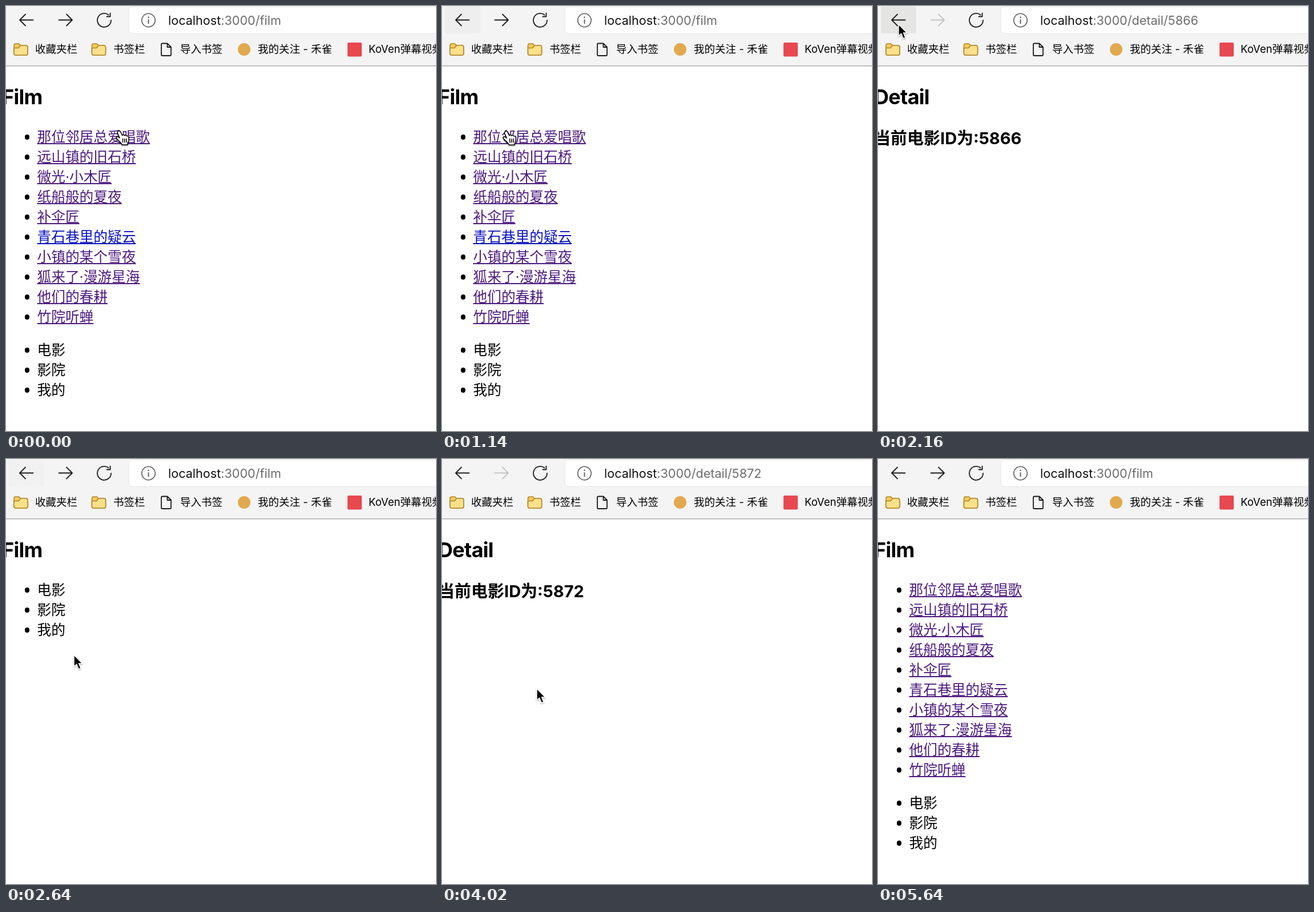
These frames come from a looping animation (753x744 px, 5700 ms). An HTML page:

```html
<!DOCTYPE html>
<html lang="zh-CN">
<head>
<meta charset="utf-8">
<title>Film list</title>
<style>
html, body { margin: 0; width: 100%; height: 100%; overflow: hidden; background: #fff; }
body { position: relative; color: #000; font-family: Inter, "Noto Sans CJK SC", "Noto Sans CJK", sans-serif; }
svg { position: absolute; left: 0; top: 0; overflow: visible; }
h2, h3 { position: absolute; left: -7px; margin: 0; white-space: nowrap; }
h2 { top: 137px; font-size: 36px; line-height: 44px; letter-spacing: -.02em; }
h3 { top: 214px; font-size: 29px; line-height: 35px; }
ul { position: absolute; left: 0; top: 211.5px; margin: 0; padding: 0; list-style: none; font-size: 24.7px; line-height: 35px; }
li { position: relative; height: 35px; padding-left: 54.5px; white-space: nowrap; }
li::before { content: ""; position: absolute; left: 32.5px; top: 13.5px; width: 8.5px; height: 8.5px; border-radius: 50%; background: #000; }
a { color: #4d1b7f; text-decoration: underline 2px; text-underline-offset: 2px; text-decoration-skip-ink: none; }
a.fresh { color: #0a12c0; }
a.active { color: #cb2119; }
.icon { fill: none; stroke: #1b1b1b; stroke-width: 1.8; stroke-linecap: round; stroke-linejoin: round; }
.marks { font-size: 18.5px; }
</style>
</head>
<body>
<h2 id="title"></h2>
<h3 id="info"></h3>
<ul id="films"></ul>
<ul id="tabs"><li>电影</li><li>影院</li><li>我的</li></ul>

<svg width="753" height="744" viewBox="0 0 753 744">
  <defs>
    <g id="folder" stroke="#b1862b" stroke-width="1.6" stroke-linejoin="round">
      <path fill="#f5c95c" d="M1 4a3 3 0 0 1 3-3h5.500l3 3H22a3 3 0 0 1 3 3v11a3 3 0 0 1-3 3H4a3 3 0 0 1-3-3z"/>
      <path fill="#fde08a" d="M1 8.500h8l3.500-4.500H22a3 3 0 0 1 3 3v11a3 3 0 0 1-3 3H4a3 3 0 0 1-3-3z"/>
    </g>
    <filter id="shade" x="-50%" y="-50%" width="200%" height="200%">
      <feDropShadow dx="0" dy="1.5" stdDeviation="1.3" flood-opacity=".35"/>
    </filter>
  </defs>
  <path fill="#f4f4f4" d="M0 0h753v104H0z"/>
  <path fill="#adadad" d="M0 104h753v1.500H0z"/>
  <rect id="button" x="5" y="1" width="62" height="47" rx="4"/>
  <rect x="215" y="1.500" width="560" height="46.500" rx="6" fill="#fff" stroke="#e6e6e6"/>
  <g class="icon">
    <path d="M47.500 24.500H24M34 14.500l-10 10 10 10"/>
    <path id="forward" d="M92.500 24.500H116M106 14.500l10 10-10 10"/>
    <path d="M179.500 15.500A12 12 0 1 0 184 25M182.500 12.500v6h-6"/>
  </g>
  <g fill="none" stroke="#5a5a5a" stroke-width="1.6">
    <circle cx="249.500" cy="25" r="11.700"/>
    <path d="M249.500 23.500v7.500" stroke-width="1.900"/>
    <circle cx="249.500" cy="19.700" r="1.300" fill="#5a5a5a" stroke="none"/>
  </g>
  <text x="284" y="32.500" font-size="21.6" fill="#6c6c6c"><tspan fill="#111">localhost</tspan><tspan id="path"></tspan></text>

  <use href="#folder" x="13" y="65"/>
  <use href="#folder" x="149.500" y="65"/>
  <path class="icon" fill="#fff" d="M274 65.500h8.500l6.500 6.500v13a2 2 0 0 1-2 2h-13a2 2 0 0 1-2-2V67.500a2 2 0 0 1 2-2zM282.500 65.500V72H289"/>
  <circle cx="417" cy="76" r="11" fill="#e3a94e"/>
  <rect x="598" y="64" width="25" height="24.500" rx="2" fill="#e8484f"/>
  <g class="marks">
    <text x="51" y="82">收藏夹栏</text>
    <text x="188" y="82">书签栏</text>
    <text x="305" y="82">导入书签</text>
    <text x="441" y="82">我的关注 - 禾雀</text>
    <text x="635" y="82">KoVen弹幕视频</text>
  </g>

  <g id="cursor" filter="url(#shade)">
    <path id="arrow" fill="#000" stroke="#fff" stroke-width="1.400" stroke-linejoin="round"
      d="M0 0V20.500L4.600 16.300 8.200 24.800 12 23.200 8.500 15H14.800Z"/>
    <g id="hand" transform="translate(-5 -2)" stroke="#000" stroke-width="1.500" stroke-linejoin="round" stroke-linecap="round">
      <path fill="#fff" d="M4 2.500C6 .5 8 2 9 4l2.500 5.500C13 8 15 8.300 15.500 9.800 17 8.600 19 9 19.500 10.700 21.500 9.800 23 11 23 13v5c0 2-1.500 3.500-2 6v2H11C10.500 23 7 20.500 4 17.500 1 15 0 13 1.500 12c2-1 4 .5 5.500 2L3.500 6C3 4.500 3 3.500 4 2.500Z"/>
      <path d="M12.500 15.500v6M15.700 15.500v6M18.900 15.500v6"/>
    </g>
  </g>
</svg>

<script>
const LOOP = 5700, TICK = 60, FADE = 300;
const $ = id => document.getElementById(id);
const names = ['那位邻居总爱唱歌', '远山镇的旧石桥', '微光·小木匠', '纸船般的夏夜', '补伞匠',
  '青石巷里的疑云', '小镇的某个雪夜', '狐来了·漫游星海', '他们的春耕', '竹院听蝉'];
$('films').innerHTML = names.map(n => `<li><a>${n}</a></li>`).join('');
const links = [...document.querySelectorAll('a')];

// One visit per round: press a link, read its detail, go back, wait for the list.
const visits = [
  { link: 0, id: 5860, press: 60, open: 180, hover: 660, hold: 720, back: 840, load: 1140, leave: 960 },
  { link: 3, id: 5866, press: 1680, open: 1800, hover: 2160, hold: 2220, back: 2340, load: 2700, leave: 2400 },
  { link: 5, id: 5872, press: 3780, open: 3840, hover: 4380, hold: 4440, back: 4560, load: 4920, leave: 4800 }
];

// Pointer stops: time, x, y
const stops = [
  [0, 197, 219], [240, 197, 219], [600, 70, 60], [720, 34, 27], [900, 36, 40],
  [1200, 120, 240], [1560, 140, 333], [1920, 140, 333], [2160, 36, 32], [2220, 34, 27],
  [2340, 34, 27], [2640, 119, 343], [3060, 150, 390], [3600, 166, 402], [4020, 166, 402],
  [4260, 70, 150], [4380, 36, 32], [4440, 34, 27], [4620, 34, 27], [4800, 45, 70], [4920, 61, 203],
  [5160, 63, 704], [5460, 63, 370], [5580, 63, 275], [5700, 63, 275]
];

const within = (t, from, to) => t >= from && t < to;

function pointerAt(t) {
  const i = stops.findIndex(s => s[0] > t);
  const [t0, x0, y0] = stops[i - 1], [t1, x1, y1] = stops[i];
  const k = (t - t0) / (t1 - t0), e = k * k * (3 - 2 * k);
  return [x0 + (x1 - x0) * e, y0 + (y1 - y0) * e];
}

function buttonFill(t) {
  for (const v of visits) {
    if (within(t, v.hold, v.back)) return 'rgb(197,197,197)';
    if (within(t, v.hover, v.leave)) return 'rgb(229,229,228)';
    if (within(t, v.leave, v.leave + FADE)) {
      const c = 229 + 15 * (t - v.leave) / FADE;
      return `rgb(${c},${c},${c})`;
    }
  }
  return 'none';
}

function overLink(x, y) {
  const name = names[Math.floor((y - 212) / 35)];
  return !!name && x > 54 && x < 54 + name.length * 24.7;
}

function render(t) {
  const detail = visits.find(v => within(t, v.open, v.back));
  const waiting = visits.some(v => within(t, v.back, v.load));
  const pressed = visits.find(v => within(t, v.press, v.open));
  const listed = !detail && !waiting;

  $('title').textContent = detail ? 'Detail' : 'Film';
  $('info').textContent = detail ? '当前电影ID为:' + detail.id : '';
  $('path').textContent = ':3000/' + (detail ? 'detail/' + detail.id : 'film');
  $('films').style.display = listed ? '' : 'none';
  $('tabs').style.display = detail ? 'none' : '';
  $('tabs').style.top = listed ? '584.5px' : '211.5px';
  links.forEach((a, i) => {
    a.className = pressed && pressed.link === i ? 'active' : i === 5 && t < visits[2].open ? 'fresh' : '';
  });

  $('button').setAttribute('fill', buttonFill(t));
  $('forward').style.stroke = detail ? '#c3c3c3' : '';

  const [x, y] = pointerAt(t), hand = listed && overLink(x, y);
  $('cursor').setAttribute('transform', `translate(${x} ${y})`);
  $('cursor').style.display = t >= 5640 ? 'none' : '';
  $('hand').style.display = hand ? '' : 'none';
  $('arrow').style.display = hand ? 'none' : '';
}

const start = performance.now();
function frame() {
  const t = (performance.now() - start) % LOOP;
  render(Math.floor(t / TICK) * TICK);
  requestAnimationFrame(frame);
}
frame();
</script>
</body>
</html>
```
